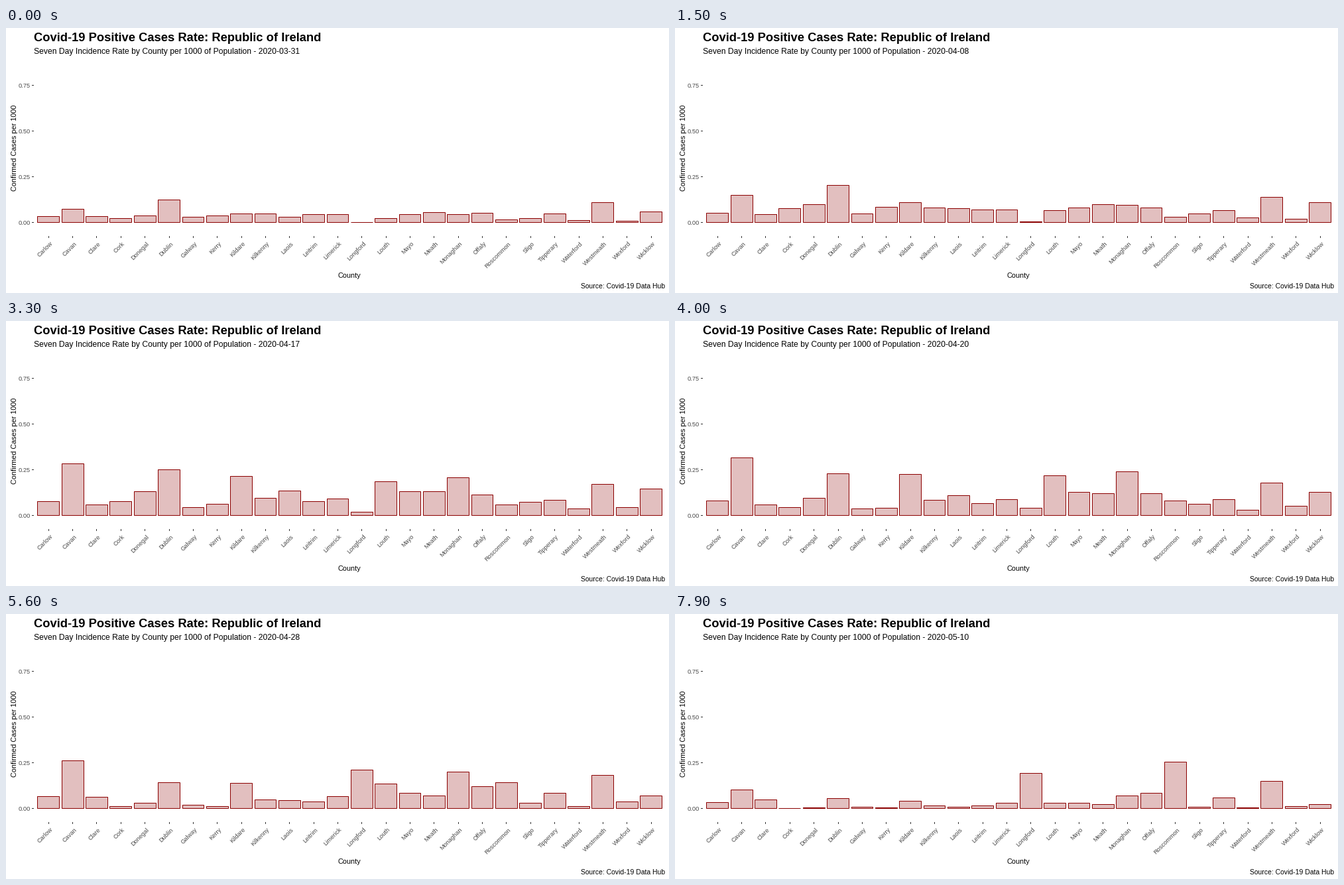
Animation, 1000 px wide and 400 px high, one loop 8000 ms. Source, as a matplotlib script:

```python
import numpy as np
import matplotlib.pyplot as plt
from matplotlib.animation import FuncAnimation
from matplotlib.patches import Rectangle

plt.rcParams["font.family"] = "Liberation Sans"

W, H, DPI = 1000, 400, 100
PX = 72 / DPI                      # one pixel in points
FRAMES, INTERVAL, DAYS = 80, 100, 40
BASE, UNIT = 293, 276              # zero row and pixels per unit of rate
LEFT, STEP = 63.8, 36.35           # first bar centre and bar spacing
START = np.datetime64("2020-03-31")
GREY = "#4D4D4D"

# Each county's wave: time of the peak, height of the peak, spread
WAVES = dict(
    Carlow=(40, 22, 25), Cavan=(43, 88, 20), Clare=(50, 17, 40),
    Cork=(24, 28, 11), Donegal=(27, 40, 13), Dublin=(30, 70, 22),
    Galway=(22, 14, 20), Kerry=(21, 25, 13), Kildare=(38, 62, 17),
    Kilkenny=(28, 27, 20), Laois=(31, 37, 14), Leitrim=(26, 22, 21),
    Limerick=(34, 25, 25), Longford=(67, 107, 9), Louth=(41, 60, 14),
    Mayo=(36, 36, 20), Meath=(31, 36, 20), Monaghan=(44, 68, 18),
    Offaly=(48, 34, 32), Roscommon=(85, 72, 24), Sligo=(31, 20, 16),
    Tipperary=(44, 24, 35), Waterford=(29, 10, 15), Westmeath=(50, 50, 45),
    Wexford=(43, 14, 16), Wicklow=(30, 40, 19),
)

fig = plt.figure(figsize=(W / DPI, H / DPI), dpi=DPI, facecolor="white")
ax = fig.add_axes([0, 0, 1, 1])
ax.set_xlim(0, W)
ax.set_ylim(H, 0)
ax.axis("off")


def label(x, y, text, size, color="black", **kw):
    return ax.text(x, y, text, fontsize=size * PX, color=color,
                   va="baseline", **kw)


def slanted(x, y, text, size, angle, **kw):
    label(x, y, text, size, rotation=angle, rotation_mode="anchor", **kw)


def tick(x, y, w, h):
    ax.add_patch(Rectangle((x, y), w, h, fc="#333333", lw=0, snap=False))


def add_bar(mid):
    left, right = round(mid - 0.45 * STEP), round(mid + 0.45 * STEP)
    bar = Rectangle((left + 0.5, BASE + 0.5), right - left, 0, fc="#E2BFBF",
                    ec="#8B0000", lw=PX, snap=False, joinstyle="miter")
    return ax.add_patch(bar)


def wave(t, peak, height, spread):
    return height / np.cosh((t - peak) / spread)


label(42, 20, "Covid-19 Positive Cases Rate: Republic of Ireland", 18.33,
      weight="bold")
subtitle = label(42, 39, "", 12.13)
label(518, 377, "County", 10.9, ha="center")
label(994, 393, "Source: Covid-19 Data Hub", 10.4, ha="right")
slanted(16, 181, "Confirmed Cases per 1000", 10.9, 90, ha="center")

for rate in (0, 0.25, 0.5, 0.75):
    row = BASE - rate * UNIT
    tick(39, row, 3, 1)
    label(37, row + 4, f"{rate:.2f}", 9.25, GREY, ha="right")

bars = []
for i, county in enumerate(WAVES):
    mid = LEFT + i * STEP
    tick(round(mid), 314, 1, 3)
    slanted(mid + 7, 326, county, 9.25, 45, color=GREY, ha="right")
    bars.append(add_bar(mid))


def update(frame):
    day = round(frame * DAYS / (FRAMES - 1))
    subtitle.set_text("Seven Day Incidence Rate by County per 1000 of "
                      f"Population - {START + day}")
    for bar, shape in zip(bars, WAVES.values()):
        bar.set_height(-round(wave(frame, *shape)))
    return [subtitle, *bars]


anim = FuncAnimation(fig, update, frames=FRAMES, interval=INTERVAL,
                     repeat=True, repeat_delay=0)
plt.show()
```
